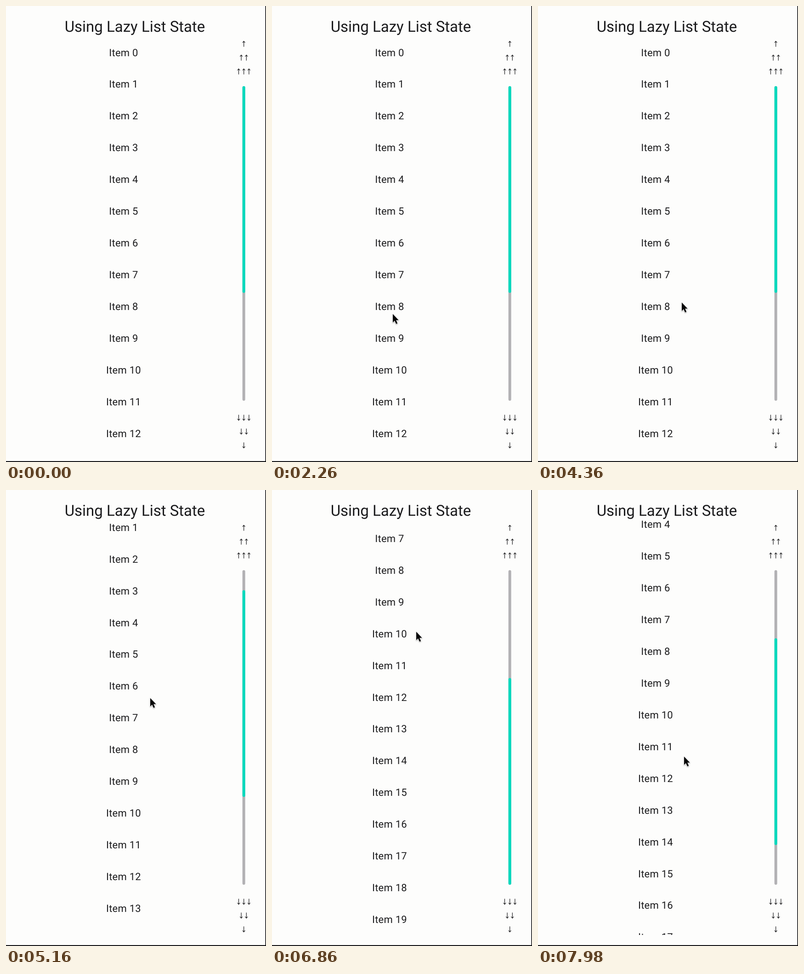
An HTML page that plays this animation: 566 by 990 pixels, repeating every 8 s.

```html
<!DOCTYPE html>
<html lang="en">
<head>
<meta charset="utf-8">
<title>Using Lazy List State</title>
<style>
  html, body { margin: 0; width: 100%; height: 100%; overflow: hidden; background: #fdfdfc; }
  svg { display: block; width: 566px; height: 990px; }
  text { font-family: Roboto, sans-serif; fill: #1b1b1d; text-anchor: middle; text-rendering: geometricPrecision; }
  #items text { font-size: 22px; letter-spacing: .2px; }
  #pointer { filter: drop-shadow(0 1.5px 1.2px rgba(0, 0, 0, .35)); }
</style>
</head>
<body>
<svg viewBox="0 0 566 990" xmlns="http://www.w3.org/2000/svg">
  <defs>
    <clipPath id="view"><rect x="0" y="66.5" width="566" height="899.5"/></clipPath>
    <g id="arrow" fill="#1b1b1d">
      <rect x="-.6" y="-5.5" width="1.2" height="12"/>
      <path d="M0 -6.6L3.3 -2.4L2.7 -1.9L0 -4.2L-2.7 -1.9L-3.3 -2.4Z"/>
    </g>
  </defs>
  <rect width="566" height="990" fill="#fdfdfc"/>
  <text x="280.5" y="56" font-size="33">Using Lazy List State</text>
  <g clip-path="url(#view)"><g id="items"></g></g>
  <g id="arrows"></g>
  <rect x="514.7" y="174" width="6" height="683" rx="3" fill="#b2b1b4"/>
  <rect id="thumb" x="514.7" y="174" width="6" height="448.8" rx="3" fill="#00d9bd"/>
  <path d="M564.5 0H566V990H0V988H564.5Z" fill="#111113"/>
  <path id="pointer" d="M1 1.8V20L5 16.2L8.2 23.2L11.2 21.9L8.2 14.9H13.6Z"
        fill="#050505" stroke="#fff" stroke-width="1.5" paint-order="stroke" stroke-linejoin="round"/>
</svg>
<script>
const LOOP = 8000, PITCH = 68.92, COUNT = 20, MAX_SCROLL = 478, MAX_THUMB = 234.3;
const $ = id => document.getElementById(id);

function add(parent, tag, attrs, content) {
  const el = document.createElementNS("http://www.w3.org/2000/svg", tag);
  for (const k in attrs) el.setAttribute(k, attrs[k]);
  if (content) el.textContent = content;
  parent.appendChild(el);
}

for (let i = 0; i < COUNT; i++)
  add($("items"), "text", { x: 255.9, y: 108.5 + i * PITCH }, "Item " + i);

function arrowRow(n, y, turn) {
  for (let i = 0; i < n; i++) {
    const x = 517.7 + (i - (n - 1) / 2) * 11.2;
    add($("arrows"), "use", { href: "#arrow", transform: `translate(${x} ${y}) rotate(${turn})` });
  }
}
for (let n = 1; n <= 3; n++) {
  arrowRow(n, 52 + n * 30, 0);
  arrowRow(n, 984 - n * 30, 180);
}

// Times below are in ticks; each 140 ms cycle shows three, for 20, 100 and 20 ms.
function tickAt(ms) {
  const r = ms % 140;
  return 3 * Math.floor(ms / 140) + (r < 20 ? 0 : r < 120 ? 1 : 2);
}

const part = (t, from, to) => Math.min(1, Math.max(0, (t - from) / (to - from)));
const ease = (t, from, to) => { const u = part(t, from, to); return u * u * (3 - 2 * u); };
// Quick start with a long slowing tail.
const fling = (t, from, to) => (1 - (1 - part(t, from, to)) ** 2) ** 2;
// Constant acceleration from rest.
const pull = (t, from, rate) => rate * Math.max(0, t - from) ** 2;

const pointerX = t => 300 - 38 * ease(t, 0, 16) + 50 * ease(t, 54, 78)
  + ease(t, 106, 110) + 4 * ease(t, 166, 171);

// Enter, wander, drag up, then drag down.
const pointerY = t => 1010 - 310 * ease(t, 0, 16) + 13 * ease(t, 24, 38) - 46 * ease(t, 39, 49)
  - 25 * ease(t, 54, 78) - 336 * ease(t, 106, 113.3) + pull(t, 155, 1.058);

const scrollY = t => MAX_SCROLL * fling(t, 106, 122.3) - pull(t, 159.2, 1.266);

function draw(now) {
  const t = tickAt(now % LOOP), s = scrollY(t);
  $("items").setAttribute("transform", `translate(0 ${-s})`);
  $("thumb").setAttribute("y", 174 + s / MAX_SCROLL * MAX_THUMB);
  $("pointer").setAttribute("transform", `translate(${pointerX(t)} ${pointerY(t)})`);
}

const start = performance.now();
function loop() {
  draw(performance.now() - start);
  requestAnimationFrame(loop);
}
loop();
</script>
</body>
</html>
```
